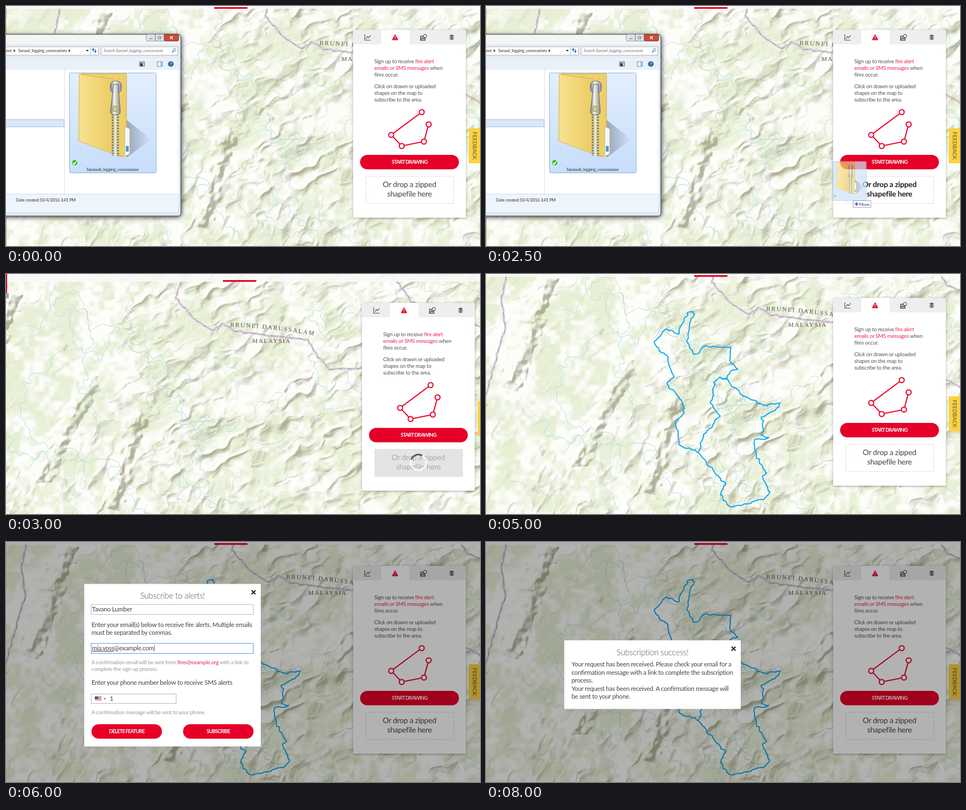
These frames come from a looping animation (854 px wide and 432 px high, 9 s). An HTML page with a canvas:

```html
<!DOCTYPE html>
<html lang="en">
<head>
<meta charset="utf-8">
<title>Subscribe to fire alerts</title>
<style>
html, body { margin: 0; width: 100%; height: 100%; overflow: hidden; background: #f4f5ec; }
#stage { position: absolute; inset: 0; overflow: hidden; contain: strict; }
canvas, svg { position: absolute; left: 0; top: 0; }
text { font: 9.75px Lato, "Open Sans", sans-serif; letter-spacing: -.25px; fill: #555; }
.mid { text-anchor: middle; }
.red { fill: #e60028; }
.pink { fill: #e8274f; }
.btn { font-size: 9.2px; font-weight: 700; letter-spacing: -.8px; fill: #fff; text-anchor: middle; }
.big { font-size: 13.7px; fill: #444; text-anchor: middle; }
.title { font-size: 14.8px; font-weight: 300; text-anchor: middle; }
.body { font-size: 11.3px; fill: #444; }
.note { fill: #999; }
.side { letter-spacing: 0; text-anchor: middle; }
.field { fill: #fff; stroke: #bbb; }
.field.on { stroke: #5b9be0; }
#win text { font-size: 7.6px; letter-spacing: -.2px; fill: #333; }
#win .find { font-style: italic; fill: #777; letter-spacing: -.1px; }
#world text { font: 11px "Liberation Serif", serif; letter-spacing: 2px; fill: #55554f; }
#world .num { font: italic 7px Lato, sans-serif; letter-spacing: 0; fill: #999985; }
#drop.over text { font-weight: 700; fill: #222; }
#drop.busy text { fill: #aaa; }
#drop.busy rect { fill: #e4e4e4; }
#tile.hover { stroke: #5f93d3; fill: #bcd9fb; }
</style>
</head>
<body>
<div id="stage">
<canvas id="relief" width="1032" height="464"></canvas>
<svg id="scene" width="854" height="432" fill="none">
  <defs>
    <linearGradient id="sel" x2="0" y2="1"><stop stop-color="#e3effd"/><stop offset="1" stop-color="#c6defa"/></linearGradient>
    <linearGradient id="gold"><stop stop-color="#f9e28e"/><stop offset="1" stop-color="#e8c65a"/></linearGradient>
    <linearGradient id="steel"><stop stop-color="#777"/><stop offset=".4" stop-color="#f4f4f4"/><stop offset="1" stop-color="#888"/></linearGradient>
    <linearGradient id="shade"><stop stop-color="#445" stop-opacity=".4"/><stop offset="1" stop-color="#445" stop-opacity="0"/></linearGradient>
    <filter id="soft"><feDropShadow dx="0" dy="1" stdDeviation="2" flood-opacity=".35"/></filter>
    <filter id="deep"><feDropShadow dx="1" dy="2" stdDeviation="4" flood-opacity=".75"/></filter>
    <path id="arc" d="M505 66Q575 67 664 83"/>
    <path id="close" d="M-3.5-3.5l7 7m0-7l-7 7" stroke="#111" stroke-width="1.8"/>
    <g id="folder">
      <path d="M217 205L262 240 217 273Z" fill="url(#shade)"/>
      <path d="M136 122H217V270H205Z" fill="#edd06c" stroke="#cda93f"/>
      <path d="M214 217L223 221V266L214 271Z" fill="#f4f7fb" stroke="#c8b468"/>
      <path d="M216 252h5v10h-5z" fill="#4b94d8"/>
      <path d="M132 123L192 131V262L209 272 131 243Z" fill="url(#gold)" stroke="#d6b44c"/>
      <path d="M197 194V270" stroke="#85857d" stroke-width="13" stroke-dasharray="3 2"/>
      <path d="M197 194V270" stroke="#e9e7dc" stroke-width="5" stroke-dasharray="4 1"/>
      <rect x="188" y="135" width="20" height="22" rx="8" fill="url(#steel)" stroke="#777"/>
      <path d="M194 141h8l4 50q-1 5-9 5t-9-5z" fill="url(#steel)" stroke="#666"/>
      <rect x="192" y="180" width="9" height="10" rx="4" fill="#d9c987" stroke="#888"/>
      <circle cx="124" cy="282" r="5.5" fill="#35b335" stroke="#fff"/>
      <path d="M121 282l2 3 4-6" stroke="#fff" stroke-width="1.6"/>
    </g>
  </defs>
</svg>
</div>
<script>
const $ = id => document.getElementById(id);
const clamp = (v, a = 0, b = 1) => Math.min(b, Math.max(a, v));
const mix = (a, b, k) => a + (b - a) * k;
const pairs = s => s.split(' ').map(p => p.split(',').map(Number));
const repeat = (n, f) => Array.from({ length: n }, (_, i) => f(i)).join('');

// Seeded value noise
function hash(x, y) {
  let n = Math.imul(x, 374761393) + Math.imul(y, 668265263) | 0;
  n = Math.imul(n ^ n >>> 13, 1274126177);
  return ((n ^ n >>> 16) >>> 0) / 2 ** 32;
}
function noise(x, y) {
  const i = Math.floor(x), j = Math.floor(y);
  let u = x - i, v = y - j;
  u *= u * (3 - 2 * u); v *= v * (3 - 2 * v);
  return mix(mix(hash(i, j), hash(i + 1, j), u), mix(hash(i, j + 1), hash(i + 1, j + 1), u), v);
}
const ridge = (x, y) => 1 - Math.abs(2 * noise(x, y) - 1);

// Ridged hills, turning from north-east in the middle to north in the south
function hills(x, y, angle) {
  const c = Math.cos(angle), s = Math.sin(angle);
  const u = x * c - y * s + noise(x / 22, y / 22) * 18, v = x * s + y * c + noise(x / 17 + 9, y / 17) * 14;
  const main = ridge(u / 58, v / 27);
  return main * 11 + ridge(u / 23, v / 13) * (2 + 4 * main) + ridge(u / 10, v / 7) * 1.6;
}
// A long crest from (x0, y0) to (x1, y1) with ragged flanks
function crest(x, y, x0, y0, x1, y1) {
  const dx = x1 - x0, dy = y1 - y0, px = x - x0, py = y - y0;
  const k = clamp((px * dx + py * dy) / (dx * dx + dy * dy));
  const d = Math.hypot(px - dx * k, py - dy * k) + (noise(x / 9, y / 9) - .5) * 16;
  return 16 * clamp(1 - d / 20);
}
function height(x, y) {
  const south = clamp((y - 230 + (300 - x) * .4) / 120);
  const rough = clamp((x - 240 + Math.max(0, y - 130) * .9) / 100, .3, 1) * (.65 + .5 * noise(x / 80 + 7, y / 80));
  const base = (south < 1 && (1 - south) * hills(x, y, .55)) + (south > 0 && south * hills(x, y, 1.1));
  return base * rough + Math.max(crest(x, y, 250, 170, 165, 330), crest(x, y, 110, 10, 45, 190), crest(x, y, 335, 230, 292, 380));
}
function paintRelief() {
  const { width: w, height: h } = $('relief'), ctx = $('relief').getContext('2d');
  const img = ctx.createImageData(w, h), z = new Float32Array(w * h);
  const lit = [253, 253, 250], low = [231, 239, 213], shade = [163, 161, 137];
  for (let i = 0; i < w * h; i++) z[i] = height(i % w - 60, Math.floor(i / w) - 30);
  for (let i = 0; i < w * h; i++) {
    const x = i % w, y = Math.floor(i / w);
    const slope = (z[i + w + 1] - z[i - w - 1]) || 0;
    const green = clamp((noise(x / 34, y / 34) * .55 + noise(x / 9, y / 9) * .45 - .32) * 3.5) * clamp(1 - slope * .35);
    const dark = clamp((-slope - .3) * .24, 0, .8);
    for (let k = 0; k < 3; k++) img.data[i * 4 + k] = mix(mix(lit[k], low[k], green), shade[k], dark);
    img.data[i * 4 + 3] = 255;
  }
  ctx.putImageData(img, 0, 0);
}

// Roughens a polyline with a position-based jitter, so shared edges coincide
function line(points, amp, attrs) {
  const p = pairs(points), out = [], jolt = (x, y) => (noise(x / 5, y / 5) - .5) * amp;
  for (let i = 1; i < p.length; i++) {
    const [ax, ay] = p[i - 1], [bx, by] = p[i], n = Math.ceil(Math.hypot(bx - ax, by - ay) / 3);
    for (let k = 0; k <= n; k++) {
      const x = mix(ax, bx, k / n), y = mix(ay, by, k / n);
      out.push((x + jolt(x, y)).toFixed(1) + ' ' + (y + jolt(x + 250, y)).toFixed(1));
    }
  }
  return `<path d="M${out.join('L')}" ${attrs}/>`;
}
// A stream or track that wanders around a heading
function meander(seed, attrs) {
  let x = hash(seed, 1) * 900 - 60, y = hash(seed, 2) * 420 - 30, d = `M${x} ${y}`;
  const heading = hash(seed, 3) * 1.7 - .2;
  for (let i = 0; i < 110; i++) {
    const a = heading + (noise(i / 12, seed) - .5) * 2.4 + (noise(i / 3, seed + 40) - .5) * 3;
    d += `l${(3 * Math.cos(a)).toFixed(1)} ${(3 * Math.sin(a)).toFixed(1)}`;
  }
  return `<path d="${d}" ${attrs}/>`;
}
const border = pts => line(pts, 3, 'stroke="#d8c5db" stroke-width="4" stroke-opacity=".8"') +
  line(pts, 3, 'stroke="#998a9c" stroke-dasharray="9 3 2 3"');

const spine = '422,186 411,194 411,215 405,232 420,255 390,295 384,320';
const west = spine + ' 350,309 342,268 357,250 355,230 326,198 337,188 325,148 311,138 304,122 325,98 345,107 365,68 376,72 369,80 362,120 375,146 397,130 440,133 438,155 454,170 440,177 432,190 422,186';
const east = '422,186 432,189 465,220 500,237 528,231 529,239 496,257 500,270 497,290 508,294 484,300 486,325 506,358 500,365 511,393 505,404 440,420 421,397 432,378 392,335 384,320';

const world = `<g id="world">
  ${repeat(16, i => meander(i + 60, 'stroke="#addfe3"'))}
  ${repeat(8, i => meander(i + 90, 'stroke="#c3c3bd" stroke-width=".7"'))}
  ${border('423,-30 406,14 442,53 472,73 492,60 512,74 644,89 661,117 684,142 745,141 820,185 971,270')}
  ${border('795,-30 831,21 971,70')}${border('44,-30 28,45 35,95 -10,250')}
  ${repeat(9, i => `<text class="num mid" transform="translate(${i * 105} ${80 + hash(i, 9) * 320})rotate(${-70 * hash(i, 8)})">${100 + i % 3 * 100}</text>`)}
  <text><textPath href="#arc">BRUNEI DARUSSALAM</textPath></text>
  <text x="579.5" y="95" class="mid" style="letter-spacing:1.6px">MALAYSIA</text>
  <g id="plots" stroke="#0fa9f5" stroke-width="2" stroke-linejoin="round">${line(west, 5, '')}${line(east, 5, '')}</g>
</g>`;

// Interface pieces
const lines = (x, y, lead, cls, s) => s.split('\n').map((l, i) => `<text x="${x}" y="${y + i * lead}" class="${cls}">${l}</text>`).join('');
const box = (x, y, w, h, attrs) => `<rect x="${x}" y="${y}" width="${w}" height="${h}" ${attrs}/>`;
const button = (x, y, w, label, id = '') => box(x, y, w, 26, `rx="13" class="red" id="${id}"`) + lines(x + w / 2, y + 16, 0, 'btn', label);
const dialog = (id, y, h, title, content) => `<g id="${id}">${box(141, y, 318, h, 'fill="#fff"')}
  ${lines(300, y + 26.5, 0, 'title', title)}<use href="#close" x="446" y="${y + 15}"/>${content}</g>`;

const explorer = `<g id="win">
  ${box(-20, 51, 335, 327, 'rx="5" fill="#e3ebf2" stroke="#3a4148" filter="url(#deep)"')}
  ${box(0, 52, 312, 17, 'fill="#f4f6f3"')}
  ${box(252.5, 51, 33, 12, 'rx="2" fill="#dfe5e9" stroke="#8b959d"')}${box(285, 51, 26, 12, 'rx="2" fill="#cb4a38" stroke="#7b3029"')}
  <path d="M269 51V63M258 59h6M274 55h5v4h-5z" stroke="#667"/><path d="M295.5 54.5l5 5m0-5l-5 5" stroke="#fff" stroke-width="1.6"/>
  ${box(-2, 73.5, 168.5, 15, 'class="field"')}${box(171.5, 73.5, 138, 15, 'class="field"')}
  ${lines(0, 83, 0, '', 'ext')}${lines(22, 83, 0, '', 'Sarawl_logging_concessions')}${lines(176, 83, 0, 'find', 'Search Sarawl_logging_concessions')}
  <path d="M14 78l3 2.5-3 2.5zM113 78l3 2.5-3 2.5zM144 79h5l-2.5 3zM255 103h5l-2.5 3z" fill="#222"/>
  <path d="M152.5 74V88" stroke="#b4c0cc"/>
  <path d="M157 82v-5l-2 2m2-2l2 2M161 78v5l-2-2m2 2l2-2M302 81l-3 3" stroke="#2f6fb7" stroke-width="1.4"/><circle cx="303.5" cy="79" r="2.5" stroke="#4e7fb5"/>
  ${box(0, 93, 311, 22, 'fill="#e9f0f9"')}
  ${box(240.5, 100.5, 9, 8, 'fill="#9dc7e9" stroke="#777"')}${box(242, 103, 4, 5, 'fill="#333"')}
  ${box(272.5, 100.5, 9, 8, 'fill="#fff" stroke="#5d8fc4"')}${box(278, 101, 3, 7, 'fill="#a9cdf0"')}
  <circle cx="297" cy="104.5" r="5" fill="#2a62ae"/><text x="297" y="107.5" class="mid" style="fill:#fff;font-weight:700">?</text>
  ${box(0, 115, 311, 223, 'fill="#fff"')}<path d="M105.5 115V338" stroke="#dbe3ec"/>
  ${box(-3, 204.5, 107.5, 13, 'fill="#d9e8fa" stroke="#a3c2e6"')}
  ${box(-1, 338.5, 312, 34, 'fill="#eff5fc" stroke="#cfdbe8"')}
  ${lines(18, 352, 0, '', 'Date created:')}${lines(60.5, 352, 0, '', '10/4/2016 3:41 PM')}
  ${box(114.5, 120.5, 156, 180, 'id="tile" rx="2" fill="url(#sel)" stroke="#8db4e2"')}
  <use href="#folder"/>${lines(192, 297, 0, 'mid', 'Sarawak_logging_concessions')}
</g>`;

const knots = '749,191 694,232 713,252 753,244 761.5,213';
const fields = 'FID objectid_1 objectid name folderpath symbolid altmode base clamped extruded snippet popupinfo shape_leng name_1 name_of_gr permit_dat area_offic net_planta planted_as concession source_of additional';

const panel = `<g id="ui">
  ${box(-20, -20, 900, 25, 'fill="#fafafa" fill-opacity=".88"')}${box(375, 2, 60, 3, 'class="red"')}
  ${box(-20, -10, 6, 36, 'class="red"')}${box(-16, 25, 5, 10, 'fill="#aaa"')}
  ${box(625.5, 43, 203, 338, 'id="sheet" fill="#fff" filter="url(#soft)"')}
  ${box(625.5, 43, 50.5, 26, 'fill="#eee"')}${box(727, 43, 101.5, 26, 'fill="#eee"')}
  <path d="M646.5 51V61.5H657M648.5 59l3-4 2 2 3.5-4.5" stroke="#555" stroke-width="1.2"/>
  <path d="M701 51.5l5 9.5h-10z" class="red" stroke="#e60028" stroke-linejoin="round"/><path d="M701 54v6" stroke="#fff" stroke-width="1.2" stroke-dasharray="3.5 1"/>
  <path d="M747 54.5h8v7h-8zM748 60l2.5-3 2 2 2-2" stroke="#444" stroke-width="1.3"/><circle cx="755" cy="54" r="3" fill="#eee" stroke="#444"/>
  ${repeat(3, i => `<path d="M798 ${59 - i * 2.7}l5-2.5 5 2.5-5 2.5z" fill="#555" stroke="#eee" stroke-width=".7"/>`)}
  <g id="intro">
    ${lines(663.5, 103, 12, '', 'Sign up to receive <tspan class="pink">fire alert</tspan>\n<tspan class="pink">emails or SMS messages</tspan> when\nfires occur.')}
    ${lines(663.5, 148, 12, '', 'Click on drawn or uploaded\nshapes on the map to\nsubscribe to the area.')}
    <g stroke="#e60028" stroke-width="2"><polyline points="${knots}"/>${pairs(knots).map(([x, y]) => `<circle cx="${x}" cy="${y}" r="4.5" fill="#fff"/>`).join('')}</g>
    ${button(638, 268, 178, 'START DRAWING')}
    <g id="drop">${box(648.5, 306.5, 158, 49, 'stroke="#ccc" stroke-dasharray="2 2"')}${lines(727, 326, 17, 'big', 'Or drop a zipped\nshapefile here')}</g>
    <g id="spin" stroke-width="3"><circle cx="727" cy="330" r="14" stroke="#fff" stroke-opacity=".85"/><path d="M714 325A14 14 0 0 1 734 318" stroke="#555"/></g>
  </g>
  <g id="choose">
    ${button(638, 71, 173, 'START DRAWING')}
    <path d="M638.5 440V101.5H811V440M638.5 116.5H811" stroke="#ccc"/>
    ${lines(720, 112, 0, 'body mid', 'Choose name field')}<path d="M803 113l2.5-5 2.5 5z" class="red"/>
    ${lines(724.5, 127.5, 14.45, 'body mid', fields.replaceAll(' ', '\n'))}
    ${box(824, 180, 5, 219, 'fill="#777"')}
  </g>
  ${box(834, 220, 20, 63, 'fill="#fcd23f"')}<text transform="translate(840.5 251.5)rotate(90)" class="side">FEEDBACK</text>
</g>`;

const ghost = `<g id="ghost">
  <g opacity=".72">${box(0, 0, 60, 70, 'rx="1" fill="#cfe3fa" stroke="#9fc0e6"')}<use href="#folder" transform="scale(.385)translate(-114 -120)"/></g>
  ${box(36.5, 70.5, 32, 12, 'id="tag" fill="#fff" stroke="#aaa"')}
  <path d="M39 76.5h5m-2.5-3l3 3-3 3" stroke="#1f66b5" stroke-width="1.7"/>
  <text id="verb" x="47" y="79.5" style="font-size:8px;fill:#346"></text>
</g>`;

const form = dialog('form', 75.5, 292.5, 'Subscribe to alerts!', `
  ${box(153.5, 112.5, 292, 18, 'class="field"')}${lines(155, 125, 0, 'body', 'Tavano Lumber')}
  ${lines(154, 153, 14, 'body', 'Enter your email(s) below to receive fire alerts. Multiple emails\nmust be separated by commas.')}
  ${box(153.5, 182.5, 292, 18, 'id="mail" class="field"')}
  ${lines(155, 195, 0, 'body', '<tspan style="text-decoration:underline #e99">mia.voss</tspan>@example.com<tspan id="caret">|</tspan>')}
  ${lines(154, 220, 12, 'note', 'A confirmation email will be sent from <tspan class="pink">fires@example.org</tspan> with a link to\ncomplete the sign up process.')}
  ${lines(154, 257, 0, 'body', 'Enter your phone number below to receive SMS alerts')}
  ${box(153.5, 273.5, 153, 17, 'id="phone" class="field"')}
  ${repeat(4, i => box(160, 278 + i * 2, 12, 1, 'fill="#c8414f"'))}${box(160, 278, 6, 4.5, 'fill="#41508f"')}
  <path d="M176 281h4l-2 2.5z" fill="#555"/><text id="digits" x="187" y="285.5" class="body"></text>
  ${lines(154, 310, 0, 'note', 'A confirmation message will be sent to your phone.')}
  ${button(154, 328, 127, 'DELETE FEATURE')}${button(319, 328, 127, 'SUBSCRIBE', 'send')}`);

const done = dialog('done', 177, 123.5, 'Subscription success!', lines(154, 224, 14.5, 'body',
  `Your request has been received. Please check your email for a
confirmation message with a link to complete the subscription
process.
Your request has been received. A confirmation message will
be sent to your phone.`));

const show = (id, on) => $(id).style.display = on ? '' : 'none';
const drag = pairs('219,167 366,227 511,280 625,280');

function draw(now) {
  const t = now % 9000, loading = t >= 3000 && t < 4000, choosing = t >= 4000 && t < 5000;
  const [mx, my] = t < 3000 ? [60, 4] : loading ? [-101, 29] : choosing ? [-117, 20] : [0, 0];
  $('relief').style.transform = `translate(${mx - 60}px,${my - 30}px)`;
  $('world').setAttribute('transform', `translate(${mx} ${my})`);
  $('ui').setAttribute('transform', loading ? 'translate(16 9)' : '');

  show('win', t < 3000);
  $('tile').classList.toggle('hover', t >= 500 && t < 1000);
  const dragging = t >= 1000 && t < 3000, step = Math.floor(t / 500) - 2;
  show('ghost', dragging);
  if (dragging) $('ghost').setAttribute('transform', `translate(${drag[step]})`);
  $('tag').setAttribute('width', step ? 32 : 49);
  $('verb').textContent = step ? 'Move' : 'Move to';

  $('drop').classList.toggle('over', t >= 2500 && t < 3000);
  $('drop').classList.toggle('busy', loading);
  show('spin', loading);
  show('intro', !choosing);
  show('choose', choosing);
  $('sheet').setAttribute('height', choosing ? 400 : 338);

  show('plots', t >= 5000);
  show('dim', t >= 6000);
  show('form', t >= 6000 && t < 8000);
  show('done', t >= 8000);
  const filled = t >= 7000;
  $('mail').classList.toggle('on', !filled);
  $('phone').classList.toggle('on', filled);
  show('caret', !filled);
  $('digits').textContent = filled ? '1 202-555-0142' : '1';
  $('send').style.fill = filled ? '#b80020' : '';
  requestAnimationFrame(draw);
}

$('scene').insertAdjacentHTML('beforeend', world + explorer + panel + ghost + box(0, 0, 854, 432, 'id="dim" fill="#000" fill-opacity=".3"') + form + done);
paintRelief();
draw(0);
</script>
</body>
</html>
```
